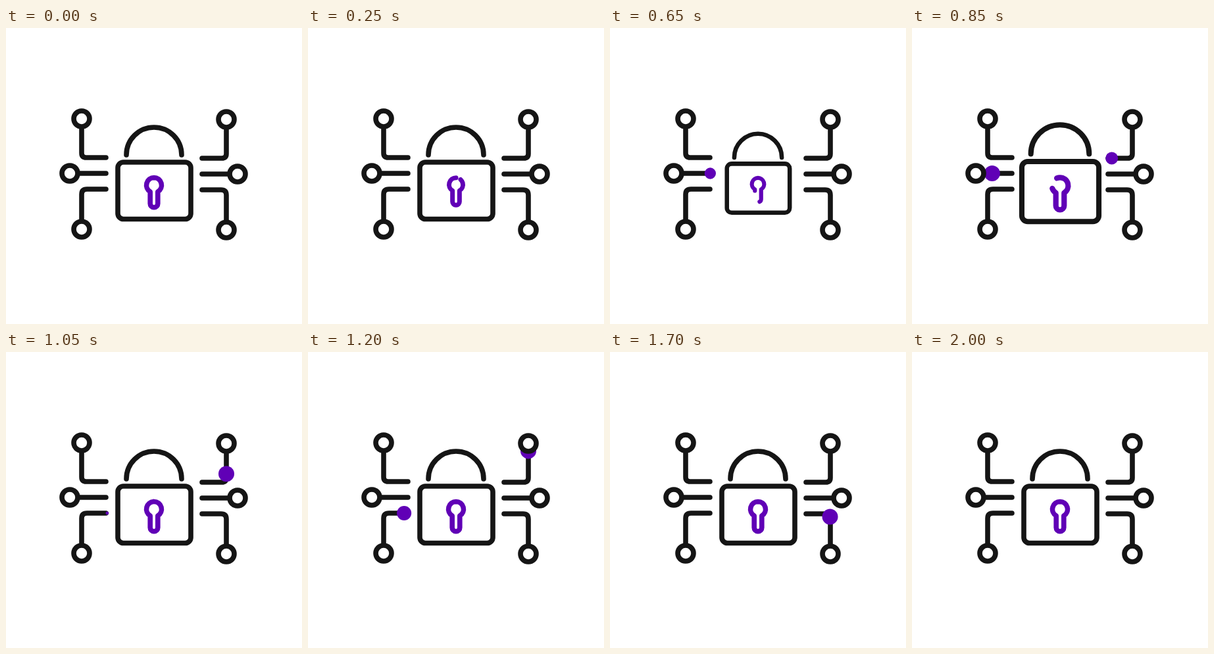
An HTML page that plays this animation: 450x450 px, repeating every 3000 ms.

```html
<!DOCTYPE html>
<html lang="en">
<head>
<meta charset="utf-8">
<title>Padlock circuit</title>
<style>
  html, body { margin: 0; width: 100%; height: 100%; overflow: hidden; background: #fff; }
  svg { display: block; width: 100%; height: 100%; }
  .ink { fill: none; stroke: #151515; stroke-width: 7.6; stroke-linecap: round; stroke-linejoin: round; }
  .ring { fill: #fff; }
  #hole { stroke: #6000b6; }
  #dots { fill: #6000b6; }
</style>
</head>
<body>
<svg viewBox="0 0 450 450">
  <g class="ink" id="wires"></g>
  <g id="dots"></g>
  <g class="ink ring" id="rings"></g>
  <g class="ink" id="lock">
    <path d="M183 193A42 42 0 0 1 267 193"/>
    <rect x="170" y="204" width="111" height="86.5" rx="8.5"/>
  </g>
  <path class="ink" id="hole" pathLength="1"
    d="M225 227.5A11.5 11.5 0 0 1 230.8 248.9V267A5.8 5.8 0 0 1 219.2 267V248.9A11.5 11.5 0 0 1 225 227.5Z"/>
</svg>
<script>
const LOOP = 3000;
const $ = id => document.getElementById(id);

// Each wire runs from its open end to its ring; start and span time its dot.
const wires = [
  { d: 'M152 197H122Q115 197 115 190V138', ring: [115, 138] },
  { d: 'M152 221H97', ring: [97, 221], track: 'M156 221H97', start: 515, span: 630 },
  { d: 'M152 245H123Q115 245 115 253V306', ring: [115, 306], track: 'M154 245H123Q115 245 115 253V306', start: 1020, span: 750 },
  { d: 'M298 198H328Q335 198 335 191V139', ring: [335, 139], start: 700, span: 700 },
  { d: 'M298 222H352', ring: [352, 222] },
  { d: 'M298 246H327Q335 246 335 254V307', ring: [335, 307], start: 1370, span: 720 }
];

function add(parent, tag, attrs) {
  const el = document.createElementNS('http://www.w3.org/2000/svg', tag);
  for (const k in attrs) el.setAttribute(k, attrs[k]);
  return parent.appendChild(el);
}

for (const w of wires) {
  add($('wires'), 'path', { d: w.d });
  add($('rings'), 'circle', { cx: w.ring[0], cy: w.ring[1], r: 12 });
  if (!w.span) continue;
  w.path = add($('dots'), 'path', { d: w.track || w.d, fill: 'none' });
  w.length = w.path.getTotalLength();
  w.dot = add($('dots'), 'circle', { r: 0 });
}

const progress = (t, start, span) => Math.min(1, Math.max(0, (t - start) / span));
const sine = u => (1 - Math.cos(Math.PI * u)) / 2;
const glide = u => u < 0.5 ? (2 * u) ** 2.5 / 2 : 1 - (2 - 2 * u) ** 2.5 / 2;

// Eased value through [time, value] keys.
function keyed(t, keys) {
  let value = keys[0][1];
  for (let i = 1; i < keys.length; i++) {
    const [t0, v0] = keys[i - 1], [t1, v1] = keys[i];
    if (t >= t0) value = v0 + (v1 - v0) * sine(progress(t, t0, t1 - t0));
  }
  return value;
}

function zoom(el, x, y, s) {
  el.setAttribute('transform', `translate(${x} ${y}) scale(${s}) translate(${-x} ${-y})`);
}

function draw(t) {
  zoom($('lock'), 225.2, 221, keyed(t, [[250, 1], [650, 0.86], [850, 1.055], [1050, 1]]));
  zoom($('hole'), 225, 230, keyed(t, [[50, 1], [570, 0.75], [850, 1.085], [1050, 1]]));

  // A gap travels clockwise around the keyhole.
  const head = sine(progress(t, 100, 860));
  const tail = sine(progress(t, 235, 865));
  const gap = head - tail;
  $('hole').style.strokeDasharray = gap > 0.001 ? `${1 - gap} ${gap}` : 'none';
  $('hole').style.strokeDashoffset = -head;

  for (const w of wires) {
    if (!w.dot) continue;
    const u = progress(t, w.start, w.span);
    const p = w.path.getPointAtLength(w.length * glide(u));
    w.dot.setAttribute('cx', p.x);
    w.dot.setAttribute('cy', p.y);
    w.dot.setAttribute('r', u < 1 ? 12 * progress(t, w.start, 200) ** 0.85 : 0);
  }
}

const begin = performance.now();
function tick() {
  draw((performance.now() - begin) % LOOP);
  requestAnimationFrame(tick);
}
tick();
</script>
</body>
</html>
```
